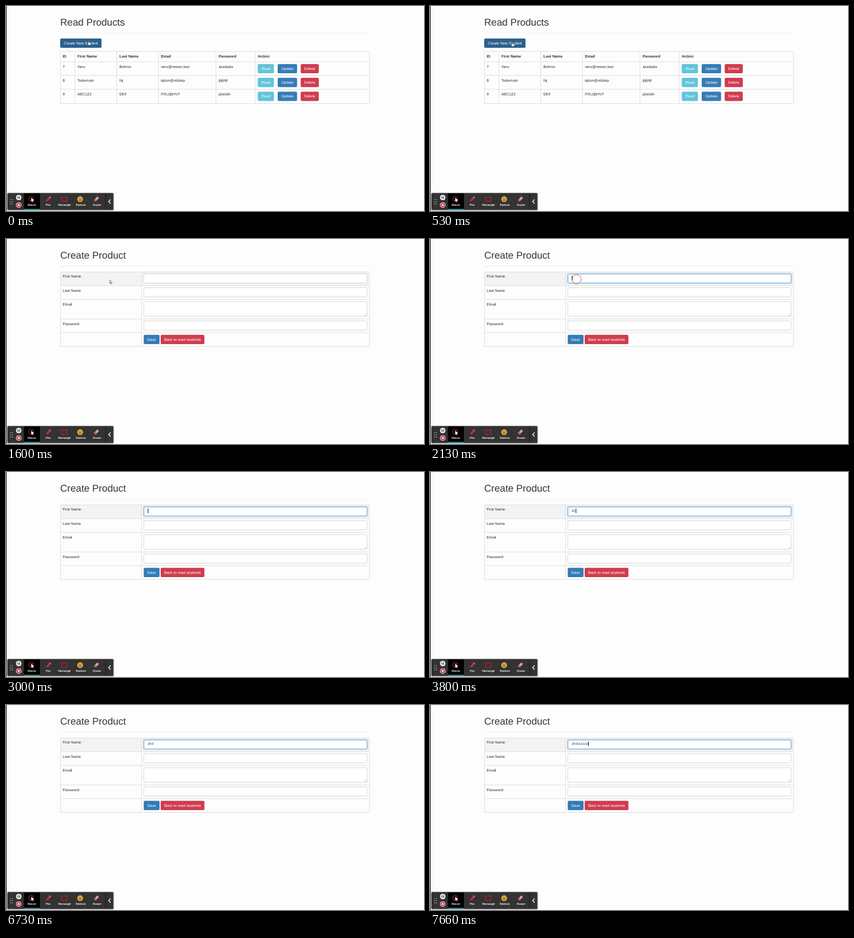
These frames come from a looping animation (640 px wide and 314 px high, 8000 ms). An HTML page:

```html
<!DOCTYPE html>
<html lang="en">
<head>
<meta charset="utf-8">
<title>Student form</title>
<style>
  html, body { margin: 0; width: 100%; height: 100%; overflow: hidden; background: #fdfdfd; }
  svg { position: absolute; left: 0; top: 0; width: 640px; height: 314px; }
  text, .field { font-family: "Liberation Sans", Arial, sans-serif; text-rendering: geometricPrecision; }
  text { white-space: pre; }
  .field { position: absolute; left: 216.4px; top: 56.4px; font-size: 5.82px; line-height: 8px; color: #555; white-space: nowrap; }
  .field::before { content: ""; animation: type 8s step-end infinite; }
  .field::after {
    content: ""; display: inline-block; width: .7px; height: 6.4px; margin-left: .2px;
    vertical-align: -1.3px; background: #333; animation: caret 8s step-end infinite;
  }
  #list { animation: list 8s step-end infinite; }
  #form { animation: form 8s step-end infinite; }
  #hand { animation: list 8s step-end infinite, nudge 8s ease-in-out infinite; }
  #arrow { animation: arrow 8s step-end infinite, travel 8s linear infinite; }
  #focus { animation: focus 8s step-end infinite; }
  #ring1 { animation: ring1 8s step-end infinite; }
  #ring2 { animation: ring2 8s step-end infinite; }
  #ring1 circle { animation: grow1 8s ease-out infinite; }
  #ring2 circle { animation: grow2 8s ease-out infinite; }

  @keyframes list { 0% { opacity: 1 } 15.7%, 100% { opacity: 0 } }
  @keyframes form { 0% { opacity: 0 } 15.7%, 100% { opacity: 1 } }
  @keyframes arrow { 0% { opacity: 0 } 15.7% { opacity: 1 } 23.6%, 100% { opacity: 0 } }
  @keyframes focus { 0% { opacity: 0 } 24.1%, 100% { opacity: 1 } }
  @keyframes nudge {
    0%, .7% { transform: translate(127px, 56.6px) }
    9.1%, 100% { transform: translate(126.3px, 59px) }
  }
  @keyframes travel {
    0%, 15.7% { transform: translate(126px, 57px) }
    20% { transform: translate(158.2px, 63px) }
    23.8%, 100% { transform: translate(224px, 61.5px) }
  }
  @keyframes ring1 { 0% { opacity: 0 } 11.6% { opacity: 1 } 13.2%, 100% { opacity: 0 } }
  @keyframes ring2 { 0% { opacity: 0 } 24.1% { opacity: 1 } 27.45%, 100% { opacity: 0 } }
  @keyframes grow1 { 0%, 11.6% { r: 3px } 13.2%, 100% { r: 7px } }
  @keyframes grow2 { 0%, 24.1% { r: 3px } 26.5%, 100% { r: 7px } }
  @keyframes type {
    0% { content: "" }
    43.2% { content: "J" }
    46.6% { content: "Je" }
    78.2% { content: "Jed" }
    86.6% { content: "Jedu" }
    88.7% { content: "Jeduu" }
    90.7% { content: "Jeduuu" }
    93.2% { content: "Jeduuuu" }
    95.7%, 100% { content: "Jeduuuuu" }
  }
  @keyframes caret {
    0% { opacity: 0 }
    24.1% { opacity: 1 } 30.7% { opacity: 0 }
    37.45% { opacity: 1 } 53.2% { opacity: 0 }
    54.1% { opacity: 1 } 60.7% { opacity: 0 }
    67.45% { opacity: 1 } 74.1% { opacity: 0 }
    78.2% { opacity: 1 } 84.1% { opacity: 0 }
    86.6%, 100% { opacity: 1 }
  }
</style>
</head>
<body>
<svg viewBox="0 0 640 314">
  <rect width="640" height="314" fill="#fdfdfd"/>
  <rect width="1" height="314" fill="#2a2a2a"/>
  <g id="list"></g>
  <g id="form"></g>
  <g id="focus" fill="none">
    <rect x="211" y="53.4" width="342" height="14.1" rx="1.7" stroke="#66afe9" stroke-opacity=".25" stroke-width="2.6"/>
    <rect x="211" y="53.4" width="342" height="14.1" rx="1.7" stroke="#7fb9dc" stroke-width=".8"/>
  </g>
  <g id="toolbar">
    <rect x="1.5" y="286" width="164" height="27.5" rx="2" fill="#9a9a9a" opacity=".55"/>
    <rect x="2" y="286.5" width="162.5" height="26" rx="1.5" fill="#333"/>
    <rect x="27.5" y="287" width="24.5" height="25" fill="#000"/>
    <rect x="27.5" y="310.8" width="24.5" height="1.2" fill="#23a5b5"/>
    <rect x="152" y="287" width=".8" height="25" fill="#161616"/>
    <path d="M160.2 296.3l-3 3.2 3 3.2" fill="none" stroke="#fff" stroke-width="1.1"/>
    <path d="M7.2 296v8M9.8 296v8" stroke="#ccc" stroke-width="1.1" stroke-dasharray="1.1 2.2"/>
    <circle cx="19.5" cy="293.4" r="4.1" fill="#f2f2f2"/>
    <path d="M18.3 291.6v3.6M20.7 291.6v3.6" stroke="#333" stroke-width="1.1"/>
    <circle cx="19.5" cy="304.8" r="4.1" fill="#f2e4e4"/>
    <circle cx="19.5" cy="304.8" r="3.2" fill="#c9323f"/>
    <rect x="18.2" y="303.5" width="2.6" height="2.6" fill="#fff"/>
    <circle cx="38.6" cy="295.4" r="3.7" fill="none" stroke="#c8323e" stroke-width=".9"/>
    <path d="M38.6 293.4v6.4l1.5-1.4 1 2 1-.5-1-1.9h2z" fill="#fff"/>
    <path d="M61.4 299.8l1.2-3.6 3.4-3.6 2.2 2-3.4 3.8z" fill="#d4253a"/>
    <path d="M66 292.6l1-1.1 2 1.9-.8 1.2z" fill="#e88a92"/>
    <rect x="85.2" y="292.6" width="8.2" height="6.6" fill="none" stroke="#c51d30" stroke-width="1.1"/>
    <circle cx="113.5" cy="295.8" r="4.4" fill="#e9b13c"/>
    <path d="M111.3 294.6h1.4M114.4 294.6h1.4" stroke="#5b3c12" stroke-width="1"/>
    <path d="M110.9 296.6q2.6 3.6 5.2 0z" fill="#704218"/>
    <path d="M134.4 297.4l5.2-5.6 2.9 2.2-5.2 5.6z" fill="#e39aa6"/>
    <path d="M134.4 297.4l1.8-2 2.9 2.2-1.8 2z" fill="#b8606f"/>
  </g>
  <g id="hand">
    <path d="M-1-3.2q.7-.8 1.3 0v2.2l2.4.6q.6.3.5 1l-.5 2.8h-3.4l-2-2.6q-.1-.9.8-.7l.9.7z" fill="#fff" stroke="#222" stroke-width=".7"/>
  </g>
  <g id="arrow">
    <path d="M.5 0v5l1.2-1 .8 1.7 .9-.4-.8-1.6h1.5z" fill="#fff" stroke="#333" stroke-width=".6"/>
  </g>
  <g fill="#fff" fill-opacity=".3" stroke="#cf5b64" stroke-width=".9">
    <g id="ring1"><circle cx="126.3" cy="57"/></g>
    <g id="ring2"><circle cx="224.5" cy="61.7"/></g>
  </g>
</svg>
<div class="field" id="field"></div>
<script>
  const NS = "http://www.w3.org/2000/svg";
  const BODY = 5.82, LINE = "#e3e3e3";
  const BLUE = "#357cb6", RED = "#cf3d4e", CYAN = "#62c4da";

  function add(parent, tag, attrs, text) {
    const el = document.createElementNS(NS, tag);
    for (const key in attrs) el.setAttribute(key, attrs[key]);
    if (text) el.textContent = text;
    parent.append(el);
    return el;
  }
  const label = (g, x, y, text, more) =>
    add(g, "text", { x, y, "font-size": BODY, fill: "#333", ...more }, text);
  const hline = (g, y, fill = LINE) => add(g, "rect", { x: 83, y, width: 474, height: 1, fill });
  const vline = (g, x, top, bottom) =>
    add(g, "rect", { x, y: top, width: 1, height: bottom - top, fill: LINE });

  function button(g, x, y, width, fill, text) {
    add(g, "rect", { x, y, width, height: 14.1, rx: 1.7, fill });
    label(g, x + 5.4, y + 9, text, { fill: "#fff" });
  }
  function heading(g, text) {
    label(g, 83, 30.1, text, { "font-size": 14.97 });
    hline(g, 41, "#f3f3f3");
  }
  function input(g, y, height) {
    add(g, "rect", { x: 211, y, width: 342, height, rx: 1.7, fill: "#fff", stroke: "#ccc", "stroke-width": .7 });
  }

  const list = document.getElementById("list");
  heading(list, "Read Products");
  button(list, 83, 49.8, 63.3, "#2b618f", "Create New Student");
  const textX = [86.7, 109.2, 173.6, 237.2, 325.4, 385.4];
  ["ID", "First Name", "Last Name", "Email", "Password", "Action"].forEach((t, i) =>
    label(list, textX[i], 79.1, t, { "font-weight": "bold" }));
  [
    ["7", "Veru", "Behrov", "veru@mewn.test", "asadada"],
    ["8", "Todemum", "hij", "kplun@nblukp", "jbjbfd"],
    ["9", "ABC123", "DEF", "PXU@HVT", "plolokh"]
  ].forEach((row, r) => {
    const top = 85.2 + r * 21.2;
    row.forEach((t, i) => label(list, textX[i], top + 9.8, t));
    button(list, 385.5, top + 3.7, 24.7, CYAN, "Read");
    button(list, 416, top + 3.7, 29.7, BLUE, "Update");
    button(list, 451.2, top + 3.7, 27.7, RED, "Delete");
  });
  [69, 85, 106, 127, 149].forEach(y => hline(list, y));
  [83, 105, 169, 233, 321, 381, 556].forEach(x => vline(list, x, 69, 150));

  const form = document.getElementById("form");
  heading(form, "Create Product");
  add(form, "rect", { x: 83, y: 50, width: 474, height: 21, fill: "#f3f3f3" });
  [50, 71, 92, 122, 143, 164].forEach(y => hline(form, y));
  [83, 207, 556].forEach(x => vline(form, x, 50, 165));
  [["First Name", 59.4], ["Last Name", 80.6], ["Email", 101.9], ["Password", 131.7]].forEach(([t, y]) =>
    label(form, 86.7, y, t));
  input(form, 53.4, 14.1);
  input(form, 74.6, 14.1);
  input(form, 96, 22.3);
  input(form, 125.5, 14.1);
  add(form, "path", { d: "M549.2 117.4l3-3M551 117.4l1.2-1.2", stroke: "#999", "stroke-width": .5 });
  button(form, 210.9, 146.8, 24.2, BLUE, "Save");
  button(form, 236.8, 146.8, 67, RED, "Back to read students");

  const toolbar = document.getElementById("toolbar");
  ["Mouse", "Pen", "Rectangle", "Stickers", "Eraser"].forEach((t, i) =>
    label(toolbar, 39.6 + i * 25, 306, t, {
      "font-size": 4.05, "font-weight": "bold", "text-anchor": "middle", fill: "#fff"
    }));
</script>
</body>
</html>
```
